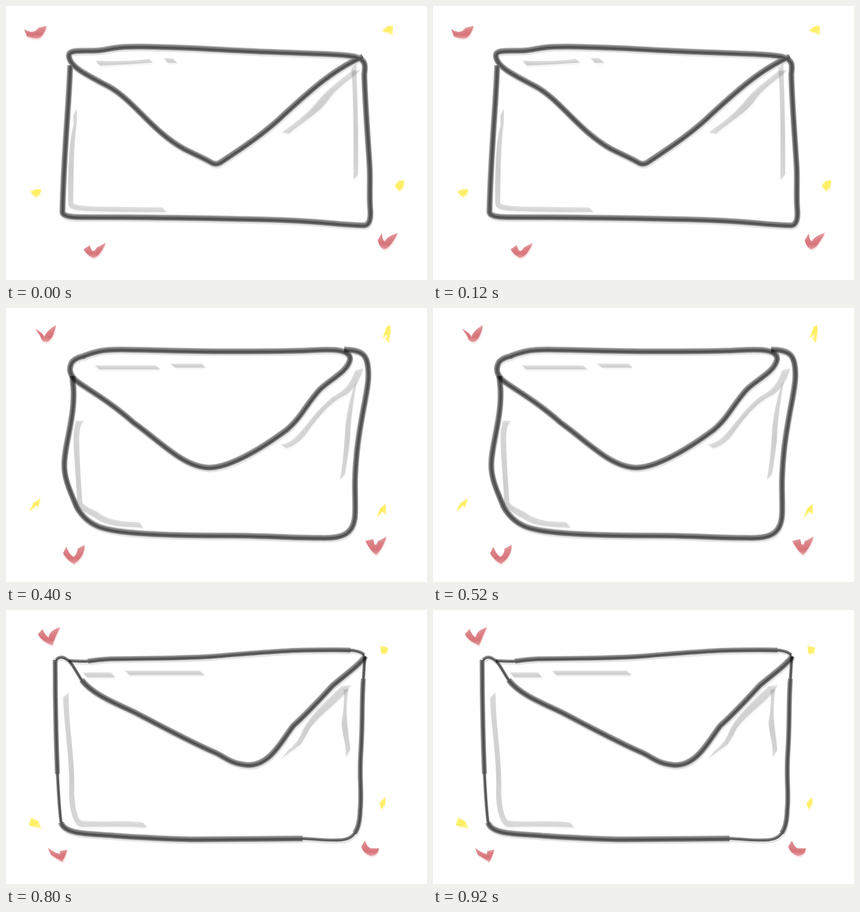
Write an HTML page without scripts that moves like this. It is 922x601 px and loops after 1 s.

```html
<!DOCTYPE html>
<html lang="en">
<head>
<meta charset="utf-8">
<title>Sketched envelope</title>
<style>
html, body { margin: 0; width: 100%; height: 100%; overflow: hidden; background: #fff; }
svg { display: block; width: 100%; height: 100%; }

.pose { visibility: hidden; animation: show 1s step-end infinite; animation-delay: calc(var(--i) * .2s - 1s); }
@keyframes show { 0% { visibility: visible; } 20%, 100% { visibility: hidden; } }

path { stroke-width: calc(var(--w, 1px) * var(--k, 1)); }
.mid { --k: .85; }
.thin { --k: .55; }

/* pen line: stacked translucent strokes, darkest below the middle */
.ink { fill: none; stroke: #000; stroke-linejoin: round; }
.drop { --w: 11px; stroke-opacity: .1; transform: translate(1px, 4px); }
.l1 { --w: 13.5px; stroke-opacity: .26; transform: translate(-.5px, -1px); }
.l2 { --w: 10.5px; stroke-opacity: .3; transform: translate(-.5px, -.8px); }
.l3 { --w: 7px; stroke-opacity: .2; }
.l4 { --w: 2.5px; stroke-opacity: .22; }

/* filled brush marks */
.grey { fill: url(#grey); }
.red { fill: url(#red); stroke: #d0545a; stroke-opacity: .12; --w: 2px; }
.gold { fill: url(#gold); stroke: #ffe95c; stroke-opacity: .15; --w: 2px; }
.shade { opacity: .25; transform: translate(1px, 4px); }
.tip { fill: #000; fill-opacity: .55; stroke: none; }
</style>
</head>
<body>
<svg viewBox="0 0 922 601" preserveAspectRatio="none">
<defs>
  <linearGradient id="grey" x2="0" y2="1">
    <stop stop-opacity=".13"/><stop offset=".6" stop-opacity=".16"/><stop offset="1" stop-opacity=".13"/>
  </linearGradient>
  <linearGradient id="red" x2="0" y2="1">
    <stop stop-color="#c63a42" stop-opacity=".5"/><stop offset=".7" stop-color="#c63a42" stop-opacity=".65"/><stop offset="1" stop-color="#c63a42" stop-opacity=".42"/>
  </linearGradient>
  <linearGradient id="gold" x2="1" y2="1">
    <stop stop-color="#ffee5a" stop-opacity=".6"/><stop offset=".5" stop-color="#ffec4a" stop-opacity=".85"/><stop offset="1" stop-color="#ffee5a" stop-opacity=".55"/>
  </linearGradient>
</defs>

<g class="pose" style="--i:0">
  <use href="#m0" class="shade"/>
  <g id="m0">
    <g class="grey">
      <path d="M196 120Q260 123 313 116L322 124Q270 128 206 131Z"/>
      <path d="M345 114L365 115 376 125 355 125Z"/>
      <path d="M155 225V255C147 310 148 380 147 432Q150 438 200 440L342 442 352 452C290 452 230 452 190 450C150 449 136 446 136 430C136 370 136 300 148 260L147 240Z"/>
      <path d="M604 277C640 252 660 235 680 212C705 180 730 165 757 142L776 141C750 165 725 178 705 207C685 235 655 250 620 280Z"/>
      <path d="M756 137L767 127C769 190 772 260 771 370L761 381C761 280 761 190 756 137Z"/>
    </g>
    <g class="red">
      <path d="M40 51Q60 64 71 48L89 44Q80 72 66 71Q54 70 46 66Z"/>
      <path d="M170 534L183 525 187 535Q192 542 199 530L218 520Q204 552 190 552Q178 546 170 534Z"/>
      <path d="M814 514L823 499Q824 515 830 516Q835 505 858 498Q840 532 829 533Q820 532 814 514Z"/>
    </g>
    <g class="gold">
      <path d="M823 54L837 44 847 44 846 63 837 58Z"/>
      <path d="M53 407L64 402 77 402 74 413 65 419Z"/>
      <path d="M851 394L859 384 872 382 870 397 862 406Z"/>
    </g>
  </g>
  <g class="ink">
    <use href="#i0" class="drop"/>
    <g class="l1"><g id="i0">
      <path d="M141 131C138 220 127 320 124 452Q124 464 165 464C290 464 420 466 560 469S720 481 785 482Q801 480 798 445C796 420 798 390 797 360S787 225 785 150C788 128 788 119 765 112C735 105 640 105 520 99S380 91 300 90S230 99 190 99C155 99 138 98 138 110C140 135 180 153 225 177C280 207 320 275 390 314C420 329 435 335 450 344Q460 350 470 344C520 311 570 277 609 239C658 194 718 138 782 112"/>
    </g></g>
    <use href="#i0" class="l2"/><use href="#i0" class="l3"/><use href="#i0" class="l4"/>
  </g>
</g>

<g class="pose" style="--i:1">
  <use href="#m1" class="shade"/>
  <g id="m1">
    <g class="grey">
      <path d="M204 135Q215 140 240 139H330L340 148H240Q220 152 204 151Z"/>
      <path d="M360 138H408L418 148H371Z"/>
      <path d="M187 280L186 297C175 350 150 410 147 432Q145 460 190 467C220 470 260 468 288 468L298 478C240 478 200 478 170 479C140 474 134 450 137 430C145 390 175 330 177 291Z"/>
      <path d="M619 287C660 288 700 240 751 190L766 188C760 205 735 220 715 243C690 265 660 295 630 298Z"/>
      <path d="M749 200L755 192C752 240 760 300 759 393L750 404C752 330 747 270 748 235Q753 215 749 200Z"/>
    </g>
    <g class="red">
      <path d="M68 49Q88 55 92 61Q96 48 112 46Q105 65 93 75Q85 60 68 49Z"/>
      <path d="M238 530Q250 540 252 546Q258 530 279 526Q268 555 254 558Q246 558 246 548Z"/>
      <path d="M804 490L817 484Q818 500 825 503Q832 497 831 488L847 491Q835 510 821 524Q808 510 804 490Z"/>
    </g>
    <g class="gold">
      <path d="M821 41L826 50 823 67 815 70 805 60Z"/>
      <path d="M89 418V435L80 448 67 436Z"/>
      <path d="M792 412L815 408 806 422Z"/>
    </g>
  </g>
  <g class="ink">
    <use href="#i1" class="drop"/>
    <g class="l1"><g id="i1">
      <path d="M152 114C180 115 200 122 275 123S410 114 480 113S620 110 740 106Q784 110 786 136Q784 146 772 153C700 197 650 240 600 283C565 313 530 340 495 354Q480 358 465 350C430 324 400 306 350 283C290 248 245 208 210 178"/>
      <path class="mid" d="M210 178Q198 167 190 156"/>
      <path class="thin" d="M190 156Q180 143 176 133"/>
      <path d="M170 106C172 150 175 200 168 250C160 320 134 390 134 432C134 470 142 482 165 483C240 492 300 497 400 497S620 485 680 479Q710 475 730 475"/>
      <path class="thin" d="M730 475C745 476 762 484 768 470"/>
      <path class="mid" d="M768 470C775 460 768 430 770 400C773 330 778 250 779 145"/>
    </g></g>
    <use href="#i1" class="l2"/><use href="#i1" class="l3"/><use href="#i1" class="l4"/>
  </g>
  <path class="tip" d="M141 107L152 108V122ZM175 96L176 106H164Z"/>
</g>

<g class="pose" style="--i:2">
  <use href="#m2" class="shade"/>
  <g id="m2">
    <g class="grey">
      <path d="M194 126H328L339 135H205Z"/>
      <path d="M359 122H428L438 131H371Z"/>
      <path d="M153 247L172 248Q160 252 160 290C161 350 166 400 167 427Q175 436 200 447C230 470 260 468 292 470L301 482C250 479 220 479 195 460Q160 442 156 430C154 370 145 300 149 265Z"/>
      <path d="M601 299C640 298 660 240 715 195C750 177 755 160 765 137L782 132C775 160 760 180 745 190C700 210 670 260 650 285Q630 305 613 307Z"/>
      <path d="M768 160C760 210 755 240 753 290Q748 330 742 365L731 377C738 340 741 300 743 260Q752 190 768 160Z"/>
    </g>
    <g class="red">
      <path d="M64 46Q82 55 84 64Q88 50 109 38Q103 70 89 74Q82 74 78 69Q76 60 64 46Z"/>
      <path d="M125 538L132 524Q138 540 148 546Q156 540 157 528L172 520Q172 545 149 561Q135 554 125 538Z"/>
      <path d="M787 511L804 507 807 519Q812 521 814 512L833 502Q826 525 811 541Q800 535 787 511Z"/>
    </g>
    <g class="gold">
      <path d="M825 66L833 42 841 37 842 52 838 76 831 67 836 62 833 58Z"/>
      <path d="M51 446L60 428 75 418 70 437 66 432Z"/>
      <path d="M812 459L820 439 831 430 832 452 824 446Z"/>
    </g>
  </g>
  <g class="ink">
    <use href="#i2" class="drop"/>
    <g class="l1"><g id="i2">
      <path d="M170 106C200 95 215 92 250 92S400 96 480 96S620 96 660 94S755 87 754 113C748 141 713 155 688 179C659 210 648 240 615 268C560 309 490 351 445 351C390 350 340 295 280 252C230 208 190 185 165 168C140 152 135 135 146 118Q156 108 174 106"/>
      <path d="M146 150C146 160 147 165 148 175C152 240 128 300 128 345C128 380 145 410 155 437C180 480 215 487 260 492S380 500 480 500S610 505 690 505C740 507 764 495 765 450S762 390 768 325C774 250 795 180 794 145C793 105 785 93 741 92"/>
    </g></g>
    <use href="#i2" class="l2"/><use href="#i2" class="l3"/><use href="#i2" class="l4"/>
  </g>
</g>

<g class="pose" style="--i:3">
  <use href="#m3" class="shade"/>
  <g id="m3">
    <g class="grey">
      <path d="M183 127Q200 134 232 123L244 130Q210 140 190 143Z"/>
      <path d="M263 122H357L369 132H274Z"/>
      <path d="M165 230V255C160 320 150 380 148 435Q150 455 200 458C240 465 270 470 312 472L321 482C260 480 210 472 170 467C142 463 137 450 137 435C140 370 153 300 155 240Z"/>
      <path d="M602 308L615 302Q610 315 622 300C660 255 690 230 715 203C735 180 745 155 772 144L784 146C760 165 745 180 725 212C700 235 670 255 650 285Q630 310 603 320Z"/>
      <path d="M776 150L783 147C778 190 770 230 767 260Q762 300 757 345L747 354C749 320 752 290 755 260C760 220 775 200 776 150Z"/>
    </g>
    <g class="red">
      <path d="M68 41Q84 49 93 52L92 45 111 37Q106 55 99 71Q80 66 71 58Z"/>
      <path d="M121 540L131 526 136 538 139 531 155 528Q148 548 135 557Q126 550 121 540Z"/>
      <path d="M779 510L790 524 795 515 804 521Q798 535 790 545Q780 535 777 526Z"/>
    </g>
    <g class="gold">
      <path d="M811 63L825 45 838 40V54L831 72 825 65Z"/>
      <path d="M47 453L60 437 71 430 65 462Z"/>
      <path d="M821 449L832 431 845 421 843 440 837 453 833 447Z"/>
    </g>
  </g>
  <g class="ink">
    <use href="#i3" class="drop"/>
    <g class="l1"><g id="i3">
      <path d="M146 122C140 160 145 190 140 240C135 310 123 380 123 455C128 480 180 489 220 498C280 503 330 500 370 501S420 507 480 507S590 509 640 510C720 512 760 500 774 455C782 420 780 370 787 310C793 240 797 190 797 120C797 96 770 93 720 88S600 87 545 87S490 99 400 99S280 98 230 98C165 99 138 101 137 122C139 145 165 150 195 168C270 207 330 255 395 303C420 317 435 320 455 332S485 350 502 350C550 349 600 300 640 250C680 195 730 152 765 119Q780 106 800 104"/>
    </g></g>
    <use href="#i3" class="l2"/><use href="#i3" class="l3"/><use href="#i3" class="l4"/>
  </g>
</g>

<g class="pose" style="--i:4">
  <use href="#m4" class="shade"/>
  <g id="m4">
    <g class="grey">
      <path d="M168 137H230L240 148H178Z"/>
      <path d="M260 133H424L436 143H271Z"/>
      <path d="M125 191L137 181C136 250 152 330 149 400Q152 455 165 462C210 466 260 460 300 466L310 477C270 475 220 474 165 476C145 472 138 430 138 400C141 330 126 250 125 191Z"/>
      <path d="M603 327L617 308Q635 295 645 275C660 235 700 200 735 167L755 165C735 200 690 225 665 260Q655 280 645 295Q620 312 603 327Z"/>
      <path d="M739 175L750 172C740 230 750 260 754 307L744 322C745 290 735 270 735 245Q742 205 739 175Z"/>
    </g>
    <g class="red">
      <path d="M70 53L80 42Q85 55 93 60Q97 44 118 38Q108 58 101 77Q78 68 70 53Z"/>
      <path d="M92 522Q108 534 118 535L119 529 134 526Q130 540 123 552Q112 545 99 537Z"/>
      <path d="M778 519L786 506Q792 522 800 523L817 523Q812 540 798 539Q782 532 778 519Z"/>
    </g>
    <g class="gold">
      <path d="M820 78L837 83 834 95 822 95Z"/>
      <path d="M55 455L71 464 77 478 50 472Z"/>
      <path d="M830 411L831 425 822 437 818 423Z"/>
    </g>
  </g>
  <g class="ink">
    <use href="#i4" class="drop"/>
    <g class="l1"><g id="i4">
      <path class="thin" d="M138 112C150 112 160 114 180 113"/>
      <path class="mid" d="M180 113Q205 109 230 108S400 107 460 102S600 90 650 89S735 88 755 89"/>
      <path class="thin" d="M755 89Q775 90 785 99"/>
      <path d="M788 102C770 125 740 145 715 167C685 200 655 232 630 254C605 285 580 342 530 341C490 338 480 322 455 312C400 288 340 255 280 224C235 203 190 185 166 154"/>
      <path class="thin" d="M166 154C150 130 145 115 132 108Q120 100 110 110"/>
      <path class="mid" d="M108 110C108 200 109 260 113 360"/>
      <path class="thin" d="M113 360Q117 440 121 467"/>
      <path d="M121 467C130 495 190 491 240 496Q360 504 420 504S580 503 650 502"/>
      <path class="thin" d="M650 502C690 504 710 507 735 505Q755 503 764 490"/>
      <path class="mid" d="M764 490Q775 475 776 440C780 400 774 380 777 320C782 250 779 200 783 152"/>
      <path class="thin" d="M783 152L786 103"/>
    </g></g>
    <use href="#i4" class="l2"/><use href="#i4" class="l3"/><use href="#i4" class="l4"/>
  </g>
</g>
</svg>
</body>
</html>
```
